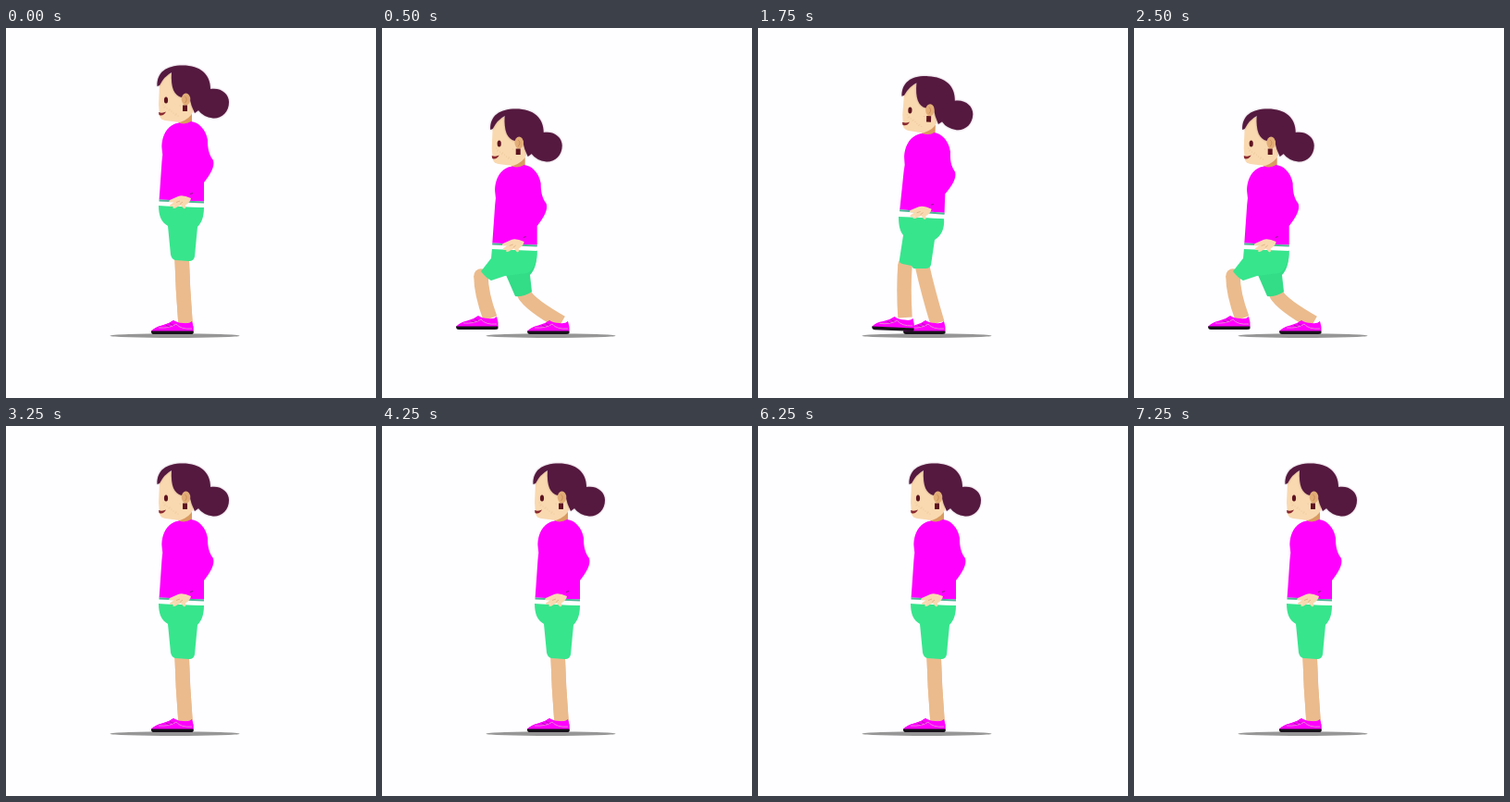
Animation, 400 px wide and 400 px high, one loop 7500 ms. Source, as an HTML page with a canvas:

```html
<!DOCTYPE html>
<html lang="en">
<head>
<meta charset="utf-8">
<title>Lunges</title>
<style>
html, body { margin: 0; width: 100%; height: 100%; overflow: hidden; background: #fefdff; }
canvas { display: block; width: 400px; height: 400px; }
</style>
</head>
<body>
<canvas id="stage" width="400" height="400"></canvas>
<script>
const ctx = document.getElementById('stage').getContext('2d');
const LOOP = 7500, STEP = 250;
const C = {
  paper: '#fefdff', skin: '#f9d9b0', leg: '#ebbb8d', neck: '#d99b61', hair: '#55193f',
  shirt: '#ff00ff', shorts: '#37e58d', shade: '#33dc87', dark: '#5e1420', sole: '#17121a'
};

// Standing, stepping out, lunging and the lowest point.
const POSES = [
  {
    body: [0, 0, 0], foot: [0, 0, 0],
    front: [190, 246, 191, 282, 194, 319], back: [190, 246, 191, 282, 194, 319],
    frontShorts: 'M165 192L214 194C214 205 211 211 207 215L204 247Q203 252 198 252L183 251Q179 250 178 245L175 214C168 210 165 203 165 192Z',
    backShorts: ''
  },
  {
    body: [-12.5, 11.5, 2], foot: [-34, -4, 2.5],
    front: [159, 256, 157, 282, 159, 313], back: [177, 255, 184, 286, 194, 319],
    frontShorts: 'M152 204L201 206C202 217 198 225 191 229L187 256Q186 260 181 260L168 260L166 257L156 255Q152 254 153 250L157 224C153 219 152 212 152 204Z',
    backShorts: ''
  },
  {
    body: [-46.3, 47, 0], foot: [-77, -5, 0],
    front: [107, 268, 107, 287, 117, 314], back: [154, 288, 160, 299, 194, 318.5],
    frontShorts: 'M119 238L167.5 240C168 252 165 261 157 265L133 268L118 273Q112 270 107 263L118 249Z',
    backShorts: 'M167.5 240C168 253 165 262 160 267L162 285Q154 291 144 290L134 267L140 240Z'
  },
  {
    body: [-60, 62, 0], foot: [-97, 0, 0],
    front: [84, 277, 87, 296, 98, 319], back: [146, 298, 154, 309, 194, 319.5],
    frontShorts: 'M105 253L154 255C155 267 151 276 143 279L117 280L94 284Q86 279 84 270L104 262Z',
    backShorts: 'M154 255C155 267 151 276 148 280L154 297Q146 303 136 303L122 279L128 254Z'
  }
];

function fill(path, color) {
  ctx.fillStyle = color;
  ctx.fill(new Path2D(path));
}

function line(path, color, width) {
  ctx.strokeStyle = color;
  ctx.lineWidth = width;
  ctx.stroke(new Path2D(path));
}

function oval(x, y, rx, ry, color) {
  ctx.fillStyle = color;
  ctx.beginPath();
  ctx.ellipse(x, y, rx, ry, 0, 0, Math.PI * 2);
  ctx.fill();
}

// Draws in standing coordinates, shifted and turned about a pivot.
function place([dx, dy, degrees], px, py, draw) {
  ctx.save();
  ctx.translate(px + dx, py + dy);
  ctx.rotate(degrees * Math.PI / 180);
  ctx.translate(-px, -py);
  draw();
  ctx.restore();
}

function shin([x0, y0, cx, cy, x1, y1]) {
  oval(x0, y0, 7.7, 7.7, C.leg);
  line(`M${x0} ${y0}Q${cx} ${cy} ${x1} ${y1}`, C.leg, 15.5);
}

function shoe() {
  fill('M157 328Q161 323 169 321.5Q176 320 181 316Q185 319 192 319Q198 320 201 317Q203 323 202.5 328Z', C.shirt);
  fill('M157 327.5H202.5V330Q202 331 199 331H160Q157 331 157 327.5Z', C.sole);
  line('M165 324Q177 325 184 320Q189 326 201 325', '#dfa3c8', 0.8);
  line('M173 321.5L177 323M177 319.5L181 321.5', '#8f1c8c', 0.7);
}

function torso() {
  fill('M186 93H201V106Q194 109 187 105Z', C.neck);
  fill('M187 102.5C175 104 168 116 168.5 130Q170 137 168.5 144L165.5 187L214 189L214 167C221 158 226 150 224 143C219 136 218 130 218 121C216 109 208 102 200 101Q194 105 187 102.5Z', C.shirt);
  fill('M165 185.5L214 187.5V194L165 192Z', '#fff');
  line('M165.5 186.5L214 188.5', '#4fb596', 2);
  fill('M200 184Q191 180 186 182L177 186Q175 188 178 188.5L182 188L177 191.5Q177 194 181 192.5L183 191.5L180 194Q182 196 185 193.5L189 191.5L192 195Q195 196 194 191.5Q199 189 200 184Z', C.skin);
  line('M184 188.5L188 187M188 190.5L191 188', '#dba779', 0.7);
  line('M199 179.5L202 178.5', '#8d1c83', 1);
}

function head() {
  fill('M166 60L173 50L190 48L203 70L202 91Q199 98 188 102L172 100Q167 99 166 95L165 83Z', C.skin);
  for (let i = 0; i < 12; i++) {
    oval(170 + i * 7 % 19, 83 + i * 5 % 13, 0.45, 0.45, '#deb489');
  }
  ctx.save();
  ctx.shadowColor = 'rgba(85,25,63,.45)';
  ctx.shadowBlur = 2;
  fill('M163.5 63C163 48 173 40.5 191 40.5C210 40.5 221 50 221 66C232 64 241 71 241 80C241 91 233 98 224 97.5Q213 96 208 89L204 92Q200 84 198 74Q194 70 190 75C182 73 178 65 179 48Q171 52 166 62Z', C.hair);
  ctx.restore();
  oval(194.5, 77, 4.8, 6.5, '#e2ad77');
  line('M193.5 74Q197 77 193.5 81', '#c98652', 0.8);
  ctx.fillStyle = C.dark;
  ctx.fillRect(191, 83.5, 5, 6.5);
  oval(173, 78, 2.1, 3.5, C.dark);
  fill('M165 91Q169 92.5 173 90.5Q170 96 165.5 94Z', '#8a2930');
}

function draw(pose) {
  ctx.fillStyle = C.paper;
  ctx.fillRect(0, 0, 400, 400);
  oval(182.5, 332.7, 70, 2.3, '#969696');
  shin(pose.back);
  shoe();
  shin(pose.front);
  place(pose.foot, 180, 331, shoe);
  fill(pose.backShorts, C.shade);
  fill(pose.frontShorts, C.shorts);
  place(pose.body, 190, 190, () => {
    torso();
    head();
  });
}

// Two lunges down and up, then rest.
function poseAt(time) {
  const tick = Math.floor(time % LOOP / STEP);
  const beat = tick < 12 ? tick % 6 : 0;
  return POSES[Math.min(beat, 6 - beat)];
}

const start = performance.now();
function frame() {
  draw(poseAt(performance.now() - start));
  requestAnimationFrame(frame);
}
frame();
</script>
</body>
</html>
```
